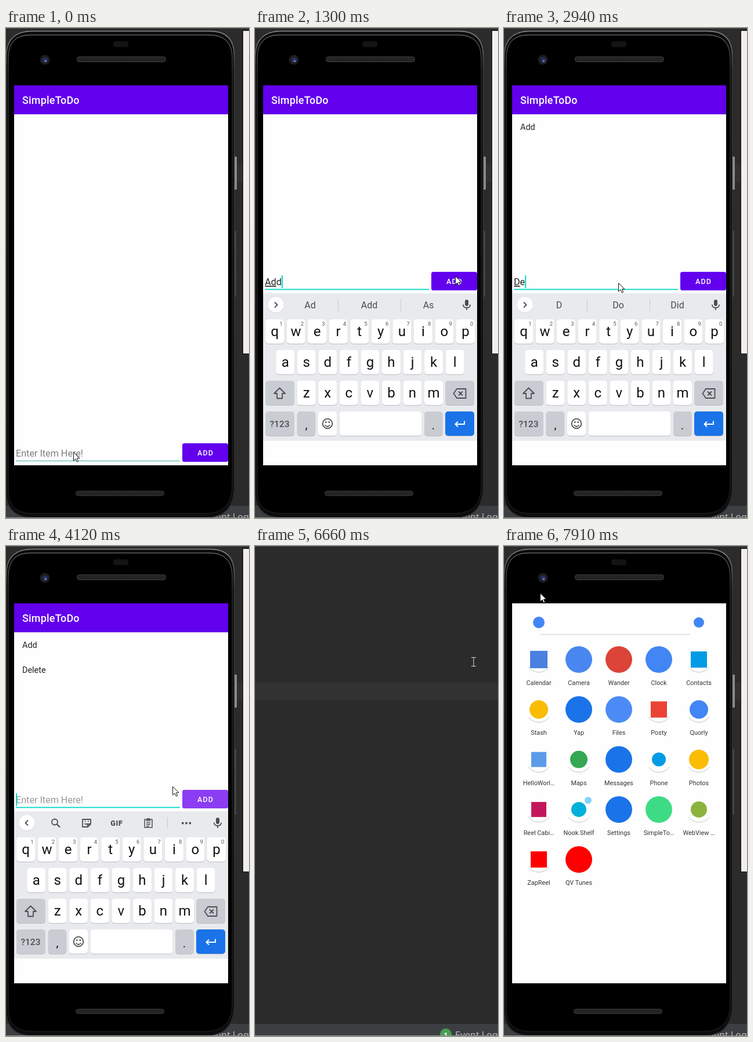
An HTML page that plays this animation: 419x846 px, repeating every 8 s.

```html
<!DOCTYPE html>
<html lang="en">
<head>
<meta charset="utf-8">
<title>To-do demo</title>
<style>
html, body { margin: 0; width: 100%; height: 100%; overflow: hidden; background: #2b2b2b; }
svg { display: block; }
text { font-family: Roboto, sans-serif; white-space: pre; }
.mid { text-anchor: middle; }
.icon { fill: none; stroke: #4a4d51; stroke-width: 1.8; stroke-linejoin: round; }
</style>
</head>
<body>
<svg width="419" height="846" viewBox="0 0 419 846">
  <defs>
    <clipPath id="clip"><rect x="14" y="99" width="369" height="656"/></clipPath>
    <pattern id="mesh" width="3" height="3" patternUnits="userSpaceOnUse">
      <rect width="3" height="3" fill="#1c1c1c"/><rect width="1.5" height="1.5" fill="#3a3a3a"/>
    </pattern>
    <linearGradient id="rim" x2="0" y2="1">
      <stop offset="0" stop-color="#8a8a8a"/><stop offset=".08" stop-color="#3a3a3a"/><stop offset="1" stop-color="#242424"/>
    </linearGradient>
  </defs>

  <!-- editor behind the phone -->
  <rect width="419" height="846" fill="#2b2b2b"/>
  <rect y="236" width="419" height="30" fill="#323232"/>
  <rect y="825" width="419" height="21" fill="#3c3f41"/>
  <circle cx="329" cy="843" r="10" fill="#499c54"/>
  <text x="329" y="849" class="mid" font-size="13" font-weight="700" fill="#fff">1</text>
  <text x="345" y="850" font-size="16" fill="#bbb" style="font-family:'Noto Sans',sans-serif">Event Log</text>
  <path id="beam" d="M373 192.500H381M373 207.500H381M377 192.500V207.500" stroke="#ddd" fill="none"/>

  <g id="phone">
    <rect x="408.500" y="4.500" width="14" height="558" fill="#f3eeee" stroke="#111"/>
    <rect x="393" y="222" width="5" height="57" rx="1" fill="#8d8d8d"/>
    <rect x="393" y="350" width="4" height="114" rx="1" fill="#444"/>
    <path d="M.5 50Q.5 5.500 45 5.500H352Q393.500 5.500 393.500 48V790Q393.500 845 345 845H45Q.5 845 .5 800Z" fill="#0c0c0c" stroke="url(#rim)" stroke-width="1.500"/>
    <path d="M4 52Q4 12 42 12H350Q390 12 390 52V790Q390 838 345 838H45Q4 838 4 800Z" fill="#000" stroke="url(#rim)"/>
    <rect x="185" y="23" width="26" height="10" rx="4" fill="#141414"/>
    <circle cx="67" cy="55" r="8.500" fill="#1d1d21"/>
    <circle cx="67.500" cy="55.500" r="4.500" fill="#2a3160"/>
    <circle cx="68.500" cy="57" r="1.500" fill="#8494d8"/>
    <rect x="122.500" y="49.500" width="153" height="9" rx="4" fill="url(#mesh)" stroke="#3a3a3a"/>
    <rect x="120.500" y="799.500" width="152" height="8" rx="4" fill="url(#mesh)" stroke="#3a3a3a"/>
    <rect x="14" y="99" width="369" height="656" fill="#fefefe"/>

    <g id="app" clip-path="url(#clip)">
      <rect x="14" y="99" width="369" height="50" fill="#6200ee"/>
      <text x="28" y="131" font-size="17.960" font-weight="500" letter-spacing=".22" fill="#fff">SimpleToDo</text>
      <g font-size="14.400" fill="#222">
        <text id="item1" x="28" y="176">Add</text>
        <text id="item2" x="28" y="219">Delete</text>
      </g>
      <g id="form">
        <text id="hint" x="17" y="444" font-size="16.160" fill="#7d7d7d">Enter Item Here!</text>
        <text id="input" x="17" y="444" font-size="16.160" fill="#222"><tspan id="done" text-decoration="underline"></tspan><tspan id="rest"></tspan></text>
        <rect id="line" x="17" width="283"/>
        <rect id="caret" y="427" width="2" height="22" fill="#03dac5"/>
        <rect id="button" x="304" y="421" width="79" height="32" rx="3.600"/>
        <text x="344" y="442" class="mid" font-size="12.570" font-weight="500" letter-spacing="1.120" fill="#fff">ADD</text>
      </g>
      <g id="keyboard">
        <rect x="14" y="712" width="369" height="300" fill="#fefefe"/>
        <rect x="14" y="458" width="369" height="254.500" fill="#e8eaed"/>
        <circle cx="36" cy="478.700" r="13.500" fill="#c9ccd0"/>
        <circle cx="36" cy="478" r="13.500" fill="#fff"/>
        <path id="chevron" class="icon" d="M34 473.500L38.500 478L34 482.500"/>
        <g id="words">
          <path d="M143.500 467V489M251.500 467V489" stroke="#c6c9cd"/>
          <g class="mid" font-size="16" fill="#4a4d51">
            <text x="95" y="484"></text><text x="197" y="484"></text><text x="299" y="484"></text>
          </g>
        </g>
        <g id="tools" class="icon">
          <path d="M278.500 468V488" stroke="#c6c9cd" stroke-width="1"/>
          <circle cx="84" cy="476.500" r="5"/><path d="M88 480.500L93 485.500" stroke-width="2.200"/>
          <path d="M132 472H146V480L141 485H132ZM141 485V480H146M135.500 479Q138 482 140.500 479M136 475.500H137.500M141 475.500H142.500"/>
          <text x="191" y="482.500" class="mid" font-size="12.500" font-weight="900" letter-spacing=".8" fill="#4a4d51" stroke="none">GIF</text>
          <path d="M239 472H252V486H239ZM242.500 472V474.500H248.500V472M242 478H249M242 481H249M242 484H246.500" stroke-width="1.500"/>
          <path d="M243 471.500H248" stroke-width="3"/>
          <path d="M303 478.500h3.400M309.300 478.500h3.400M315.600 478.500h3.400" stroke-width="3.400"/>
        </g>
        <rect x="362" y="469" width="6" height="11" rx="3" fill="#4a4d51"/>
        <path class="icon" d="M358.800 477.500Q359 483 365 483Q371 483 371.200 477.500M365 483V487"/>
        <g id="keys"></g>
        <path class="icon" d="M42.500 621.500L52 631H47V639.500H38V631H33Z"/>
        <path class="icon" d="M348 623H363.500V639H348L342.500 631ZM351 627.500L358 634.500M358 627.500L351 634.500"/>
        <circle class="icon" cx="125" cy="683" r="8.300"/>
        <path class="icon" d="M120.500 685.500Q125 690.500 129.500 685.500"/>
        <path d="M121 680.500h2.400M126.600 680.500h2.400" stroke="#4a4d51" stroke-width="2.400"/>
        <path d="M361 678.500V684H346M350 679.500L345.500 684L350 688.500" fill="none" stroke="#fff" stroke-width="2"/>
      </g>
    </g>

    <g id="drawer">
      <circle cx="60" cy="132" r="10" fill="#4285f4"/>
      <circle cx="336" cy="132" r="9" fill="#4285f4"/>
      <rect x="62" y="152" width="259" height="1.500" fill="#dcdcdc"/>
    </g>
  </g>
  <path id="mouse" d="M.5 .5V15L4 11.800L6.300 17L8.700 16L6.400 10.900H11Z" fill="#fff" stroke="#111"/>
  <rect width="419" height="1" fill="#555"/>
  <rect y="845" width="419" height="1" fill="#999"/>
</svg>

<script>
const $ = id => document.getElementById(id);
const NS = 'http://www.w3.org/2000/svg';

function add(parent, tag, attrs, text = '') {
  const el = document.createElementNS(NS, tag);
  for (const k in attrs) el.setAttribute(k, attrs[k]);
  el.textContent = text;
  parent.append(el);
}

// Keyboard
const GREY = '#c9cdd3', PITCH = 36.55;
function key(x, y, w, fill = '#fff') {
  const box = { x, width: w, height: 42, rx: 5 };
  add($('keys'), 'rect', { ...box, y: y + 1, fill: '#b9bcc1' });
  add($('keys'), 'rect', { ...box, y, fill });
}
function label(text, x, y, size, fill = '#111', weight = 400) {
  add($('keys'), 'text', { x, y, 'font-size': size, fill, 'font-weight': weight, class: 'mid' }, text);
}
[['qwertyuiop', 18, 503], ['asdfghjkl', 36.2, 556], ['zxcvbnm', 72.7, 609]].forEach(([row, x0, y], r) => {
  [...row].forEach((c, i) => {
    const x = x0 + i * PITCH;
    key(x, y, 32);
    label(c, x + 16, y + 28.7, 24);
    if (!r) label((i + 1) % 10, x + 26.8, y + 11, 9.5, '#55585c');
  });
});
key(18, 609, 50, GREY);
key(328, 609, 50, GREY);
key(18, 662, 50, GREY);
key(72.7, 662, 31.5, GREY);
key(109, 662, 32);
key(145.700, 662, 141.500);
key(292, 662, 31.500, GREY);
key(328, 662, 50, '#1a73e8');
label('?123', 42.500, 689, 15.500, '#4a4d51', 500);
label(',', 88.500, 692, 20);
label('.', 307.500, 693, 20);

// App drawer: name, colour, radius (23 fills the disc), s = square
[
  'Calendar #4a80e0 15 s', 'Camera #4a86f0 23', 'Wander #db4437 23', 'Clock #4285f4 23', 'Contacts #039be5 14 s',
  'Stash #fbbc04 16', 'Yap #1a73e8 23', 'Files #4c8bf5 23', 'Posty #ea4335 14 s', 'Quorly #4285f4 16',
  'HelloWorl… #5b9bea 13 s', 'Maps #34a853 15', 'Messages #1a73e8 23', 'Phone #039be5 12', 'Photos #fbbc04 17',
  'Reel_Cabi… #c2185b 13 s', 'Nook_Shelf #00b0d8 13', 'Settings #1a73e8 23', 'SimpleTo… #3ddc84 23', 'WebView_… #8bb33d 14',
  'ZapReel #f00 14 s', 'QV_Tunes #f00 23'
].forEach((app, i) => {
  const [name, fill, size, square] = app.split(' ');
  const cx = 60 + i % 5 * 69, cy = 196 + Math.floor(i / 5) * 86.3, r = +size, d = $('drawer');
  if (r < 23) add(d, 'path', { d: `M${cx - 18} ${cy + 13}A22.5 22.5 0 0 0 ${cx + 18} ${cy + 13}`, fill: 'none', stroke: '#c4c4c4' });
  if (square) add(d, 'rect', { x: cx - r, y: cy - r, width: 2 * r, height: 2 * r, fill });
  else add(d, 'circle', { cx, cy, r, fill });
  add(d, 'text', { x: cx, y: cy + 44, 'font-size': 10.9, fill: '#333', class: 'mid' }, name.replace('_', ' '));
});
add($('drawer'), 'circle', { cx: 145, cy: 439, r: 6, fill: '#81d4fa' });

const steps = [0];
for (const [a, b, n] of [[150, 1150, 8], [1300, 2260, 8], [2540, 2540, 1], [2940, 3970, 9], [4120, 4780, 6],
  [5060, 5060, 1], [5490, 5730, 3], [6030, 6030, 1], [6290, 6660, 4], [7520, 7910, 3]])
  for (let i = 0; i < n; i++) steps.push(Math.round(a + (b - a) * i / Math.max(1, n - 1)));

// Time, typed text, number of letters already underlined
const typing = [[0, '', 0], [579, 'A', 0], [721, 'Ad', 1], [864, 'Add', 2], [1574, '', 0],
  [2260, 'D', 0], [2540, 'D', 1], [2940, 'De', 1], [3069, 'Del', 2], [3198, 'Dele', 3],
  [3326, 'Delet', 4], [3455, 'Delete', 5], [3584, 'Delete', 6], [4120, '', 0]];
const guesses = {
  A: 'A I The', Ad: 'Ad Add As', D: 'D Do Did', De: 'De Den Def', Del: 'Del Delete Deli',
  Dele: 'Dele Delete Deleted', Delet: 'Delet Delete Deleted', Delete: 'Deleted Delete Deletes'
};
const tints = [[0, '#6200ee'], [1437, '#8533f1'], [1711, '#6d14ef'], [1849, '#6200ee'],
  [3970, '#7a29f0'], [4120, '#8b3df3'], [4252, '#7420f0'], [4384, '#6200ee']];
const fades = [[0, 1], [6290, .7], [6413, .25], [6537, 0], [7520, .6], [7715, 1]];
const slides = [[0, 300], [150, 250], [293, 110], [436, 0]];
const path = [[0, 116, 732], [579, 116, 732], [1007, 405, 470], [1150, 352, 436], [1300, 345, 428],
  [1574, 345, 428], [2123, 197, 440], [3455, 197, 440], [3841, 335, 430], [3970, 330, 432],
  [4120, 287, 415], [4780, 97, 212], [5490, 97, 212], [5730, 60, 99], [7520, 120, 130], [7910, 62, 81]];

const at = (track, t) => track.findLast(k => k[0] <= t);
const within = (t, a, b) => t >= a && t < b;
const show = (id, on) => $(id).style.display = on ? '' : 'none';
const set = (id, name, value) => $(id).setAttribute(name, value);

function pointer(t) {
  const a = at(path, t), b = path[path.indexOf(a) + 1] || a;
  const p = a === b ? 0 : (t - a[0]) / (b[0] - a[0]);
  return [1, 2].map(i => a[i] + (b[i] - a[i]) * p);
}

function draw(t) {
  const open = t >= 150, raised = t >= 293, away = t >= 6537;
  const [, text, n] = at(typing, t);

  show('item1', t >= 1574);
  show('item2', within(t, 4120, 5490));
  show('hint', !text);
  set('hint', 'fill', open ? '#9a9a9a' : '#7d7d7d');
  $('done').textContent = text.slice(0, n);
  $('rest').textContent = text.slice(n);
  set('form', 'transform', `translate(0 ${raised ? 0 : 296})`);
  set('line', 'y', open ? 450.5 : 451);
  set('line', 'height', open ? 1.8 : 1);
  set('line', 'fill', open ? '#03dac5' : '#3fae9f');
  set('button', 'fill', at(tints, t)[1]);
  set('caret', 'x', 17 + (text ? $('input').getComputedTextLength() : 0));
  show('caret', open && !within(t, 4648, 5060) && !within(t, 5490, 6030));

  set('keyboard', 'transform', `translate(0 ${at(slides, t)[1]})`);
  show('keyboard', open);
  show('words', n);
  show('tools', !n);
  set('chevron', 'transform', n ? '' : 'matrix(-1 0 0 1 72 0)');
  if (n) {
    const list = guesses[text.slice(0, n)].split(' ');
    $('words').querySelectorAll('text').forEach((el, i) => el.textContent = list[i]);
  }

  show('app', t < 7520);
  show('drawer', t >= 7520);
  set('phone', 'opacity', at(fades, t)[1]);
  show('beam', within(t, 6537, 7520));
  show('mouse', t < 6030 || t >= 7520);
  set('mouse', 'transform', `translate(${pointer(t).map(Math.round)})`);
}

function tick() {
  const now = performance.now() % 8000;
  draw(steps.findLast(s => s <= now));
  requestAnimationFrame(tick);
}
tick();
</script>
</body>
</html>
```
